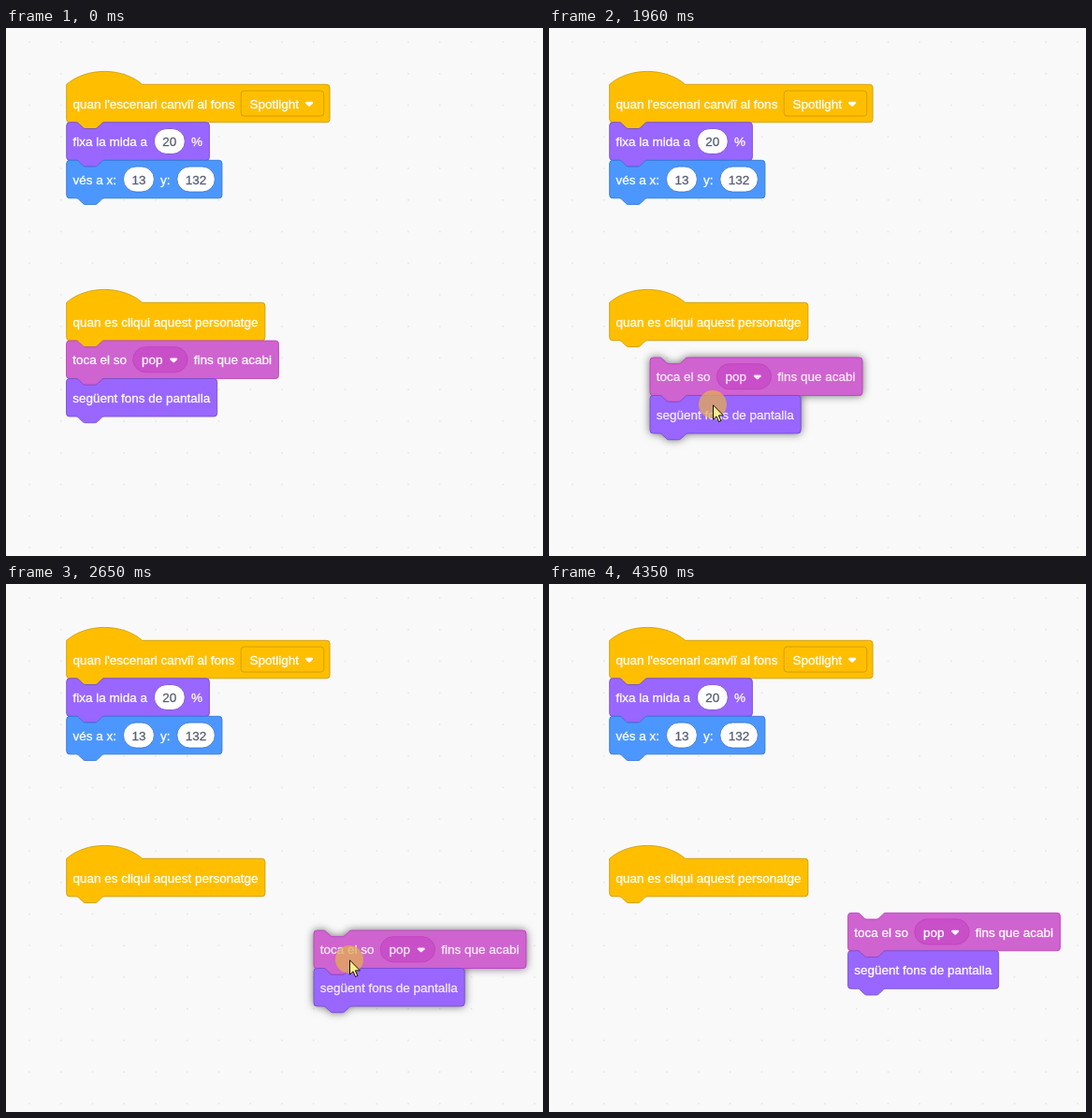
An HTML page with a canvas for the animation above (5.08 s loop, 574 by 564 pixels).

```html
<!DOCTYPE html>
<html lang="ca">
<head>
<meta charset="utf-8">
<style>
html, body { margin: 0; width: 100%; height: 100%; overflow: hidden; background: #f9f9f9; }
canvas { display: block; }
</style>
</head>
<body>
<canvas id="stage" width="574" height="564"></canvas>
<script>
const ctx = document.getElementById('stage').getContext('2d');
const LOOP = 5080, TICK = 67.9, LEAD = 16;
const S = 0.84375;   // pixels per block unit
const ROW = 48;      // block height in units
const FONT = '16px "Liberation Sans", Arial, sans-serif';

const EVENTS = { fill: '#ffbf00', edge: '#cc9900', menu: '#ffbf00' };
const LOOKS = { fill: '#9966ff', edge: '#774dcb' };
const MOTION = { fill: '#4c97ff', edge: '#3373cc' };
const SOUND = { fill: '#cf63cf', edge: '#bd42bd', menu: '#c94fc9' };

const NOTCH = 'c2,0 3,1 4,2 l4,4 c1,1 2,2 4,2 h12 c2,0 3,-1 4,-2 l4,-4 c1,-1 2,-2 4,-2';
const NOTCH_BACK = 'c-2,0 -3,1 -4,2 l-4,4 c-1,1 -2,2 -4,2 h-12 c-2,0 -3,-1 -4,-2 l-4,-4 c-1,-1 -2,-2 -4,-2';

function outline(w, hat) {
  const top = hat ? 'M0,0 c25,-22 71,-22 96,0' : 'M0,4 a4,4 0 0 1 4,-4 H12 ' + NOTCH;
  return new Path2D(`${top} H${w - 4} a4,4 0 0 1 4,4 V44 a4,4 0 0 1 -4,4 H48 ${NOTCH_BACK} H4 a4,4 0 0 1 -4,-4 Z`);
}

const block = (color, w, parts, hat = false) => ({ color, parts, path: outline(w, hat) });
const label = (x, text) => ({ kind: 'label', x, text });
const number = (x, w, text) => ({ kind: 'number', x, w, text });
const menu = (x, w, r, textX, text, arrowX) => ({ kind: 'menu', x, w, r, textX, text, arrowX });

const backdropStack = [
  block(EVENTS, 333.5, [label(8, "quan l'escenari canviï al fons"), menu(221, 105, 4, 232, 'Spotlight', 302.5)], true),
  block(LOOKS, 181, [label(8, 'fixa la mida a'), number(111, 39, '20'), label(158, '%')]),
  block(MOTION, 197, [label(8, 'vés a x:'), number(72, 39, '13'), label(119, 'y:'), number(140, 48, '132')])
];
const clickHat = [block(EVENTS, 251.5, [label(8, 'quan es cliqui aquest personatge')], true)];
const soundStack = [
  block(SOUND, 269, [label(8, 'toca el so'), menu(84.5, 69, 16, 95.5, 'pop', 131), label(161.5, 'fins que acabi')]),
  block(LOOKS, 191, [label(8, 'següent fons de pantalla')])
];
const soundShape = new Path2D();
soundStack.forEach((b, i) => soundShape.addPath(b.path, new DOMMatrix().translate(0, i * ROW)));

const arrowHead = new Path2D('M1.5,0 H8.5 Q10.5,0.4 9.5,2 L6,5.4 Q5,6.2 4,5.4 L0.5,2 Q-0.5,0.4 1.5,0 Z');
const pointer = new Path2D('M0.5,0.8 V16.2 L4,12.9 L6.5,18.6 L8.9,17.5 L6.4,11.9 H11.4 Z');

// [tick, x, y]
const pointerPath = [
  [4, 344, 558], [8, 266, 532], [11, 198, 499], [13, 148, 452], [15, 121, 412],
  [17, 105, 380], [19, 97, 360], [20, 97, 360], [21, 101, 364], [23, 101, 364],
  [24, 102, 365], [25, 106, 370], [26, 112, 377], [27, 124, 385], [29, 175, 402],
  [31, 240, 411], [33, 310, 420], [35, 360, 418], [36, 370, 414], [39, 367, 401],
  [43, 360, 391], [45, 357, 382], [54, 357, 382], [55, 354, 379], [56, 354, 384],
  [58, 366, 420], [60, 393, 474], [62, 431, 534], [63, 460, 556]
];
const stackPath = [
  [27, 64.5, 334], [29, 108, 352], [31, 178, 374.3], [33, 258, 388], [34, 293, 390],
  [36, 331, 383], [39, 329, 370], [43, 323, 360], [45, 319.5, 351.3]
];
const ENTER = 4, PRESS = 24, DRAG = 28, DROP = 51, RELEASE = 52, LEAVE = 64;

function along(path, k) {
  if (k <= path[0][0]) return path[0].slice(1);
  for (let i = 1; i < path.length; i++) {
    const [k0, x0, y0] = path[i - 1], [k1, x1, y1] = path[i];
    if (k <= k1) {
      const f = (k - k0) / (k1 - k0);
      return [x0 + (x1 - x0) * f, y0 + (y1 - y0) * f];
    }
  }
  return path[path.length - 1].slice(1);
}

function write(text, x, color) {
  ctx.fillStyle = ctx.strokeStyle = color;
  ctx.lineWidth = 0.35;
  ctx.fillText(text, x, 30);
  ctx.strokeText(text, x, 30);
}

function box(x, w, r, fill, edge) {
  ctx.beginPath();
  ctx.roundRect(x, 8, w, 32, r);
  ctx.fillStyle = fill;
  ctx.strokeStyle = edge;
  ctx.lineWidth = 1;
  ctx.fill();
  ctx.stroke();
}

function drawPart(p, color, ink) {
  if (p.kind === 'label') {
    write(p.text, p.x, ink);
  } else if (p.kind === 'number') {
    box(p.x, p.w, 16, '#fff', color.edge);
    ctx.textAlign = 'center';
    write(p.text, p.x + p.w / 2, '#575e75');
    ctx.textAlign = 'left';
  } else {
    box(p.x, p.w, p.r, color.menu, color.edge);
    write(p.text, p.textX, ink);
    ctx.save();
    ctx.translate(p.arrowX, 22);
    ctx.fill(arrowHead);
    ctx.restore();
  }
}

function drawStack(blocks, x, y, ink = '#fff') {
  ctx.save();
  ctx.translate(x, y);
  ctx.scale(S, S);
  ctx.font = FONT;
  for (const b of blocks) {
    ctx.fillStyle = b.color.fill;
    ctx.strokeStyle = b.color.edge;
    ctx.lineWidth = 1;
    ctx.fill(b.path);
    ctx.stroke(b.path);
    b.parts.forEach(p => drawPart(p, b.color, ink));
    ctx.translate(0, ROW);
  }
  ctx.restore();
}

function drawShadow(x, y) {
  ctx.save();
  ctx.translate(x, y);
  ctx.scale(S, S);
  ctx.shadowColor = 'rgba(0,0,0,0.6)';
  ctx.shadowBlur = 10;
  ctx.fillStyle = LOOKS.fill;
  ctx.fill(soundShape);
  ctx.restore();
}

function drawGrid() {
  ctx.fillStyle = '#e6e6e6';
  const gap = 40 * S;
  for (let y = 15; y < 564; y += gap)
    for (let x = 25; x < 574; x += gap) ctx.fillRect(x - 0.8, y - 0.8, 1.6, 1.6);
}

function drawPointer(k) {
  const [x, y] = along(pointerPath, k);
  const pressed = k >= PRESS && k < RELEASE;
  if (pressed) {
    ctx.fillStyle = 'rgba(228,172,82,0.75)';
    ctx.beginPath();
    ctx.arc(x, y, 15, 0, Math.PI * 2);
    ctx.fill();
  }
  ctx.save();
  ctx.translate(x, y);
  ctx.fillStyle = !pressed ? '#fff' : k < DRAG ? '#ffff5c' : '#fdec8c';
  ctx.strokeStyle = '#111';
  ctx.lineWidth = 1;
  ctx.fill(pointer);
  ctx.stroke(pointer);
  ctx.restore();
}

function draw(t) {
  const k = Math.floor((t + LEAD) / TICK);
  ctx.fillStyle = '#f9f9f9';
  ctx.fillRect(0, 0, 574, 564);
  drawGrid();
  drawStack(backdropStack, 64.7, 60.3);
  drawStack(clickHat, 64.7, 293.3);
  const [x, y] = along(stackPath, k);
  const held = k >= DRAG && k < DROP;
  if (held) drawShadow(x, y);
  drawStack(soundStack, x, y, held ? 'rgba(255,255,255,0.85)' : '#fff');
  if (k >= ENTER && k < LEAVE) drawPointer(k);
}

const start = performance.now();
function loop() {
  draw((performance.now() - start) % LOOP);
  requestAnimationFrame(loop);
}
loop();
</script>
</body>
</html>
```
